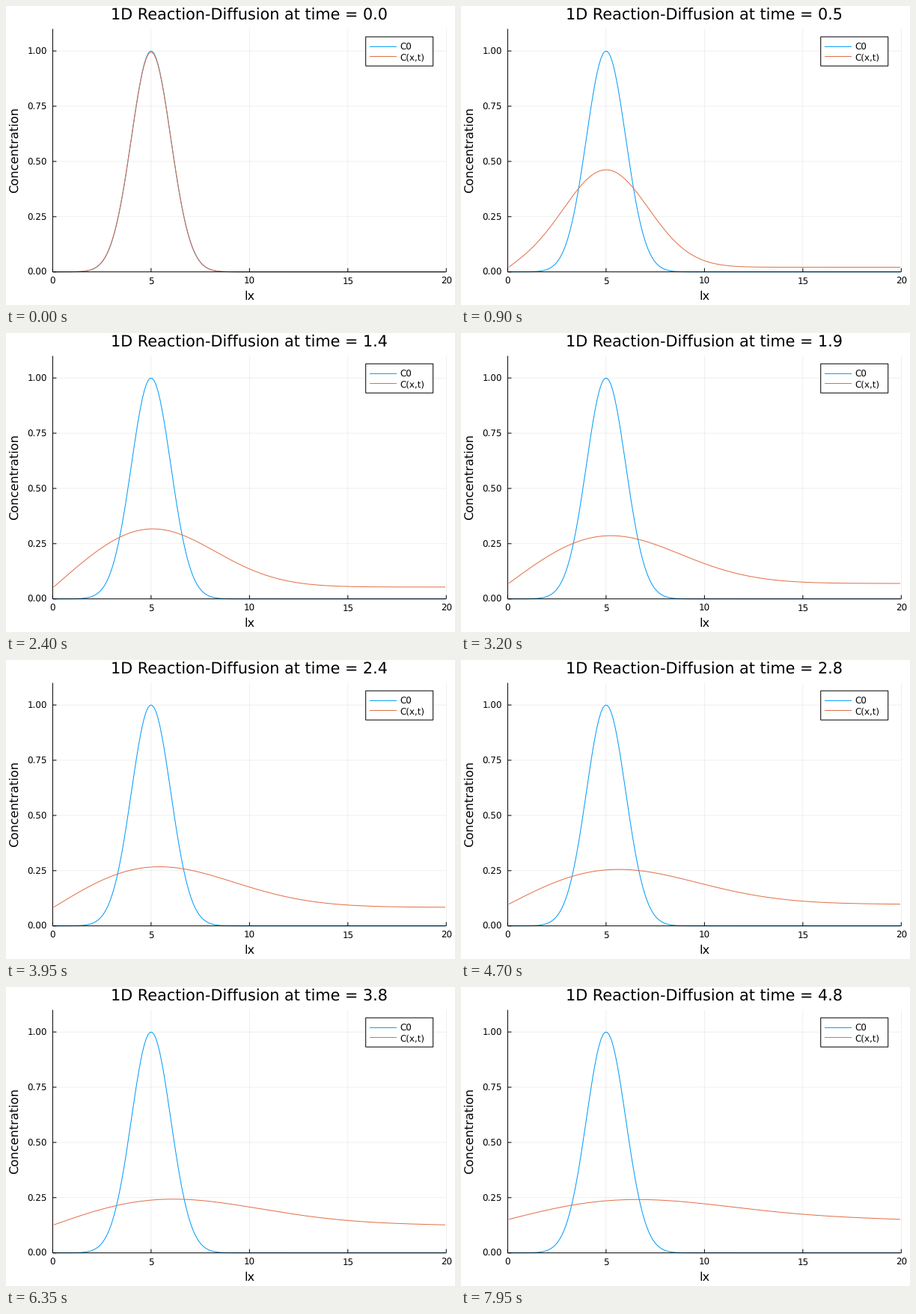
Animation, 600 px wide and 400 px high, one loop 8 s. Source, as a matplotlib script:

```python
import numpy as np
import matplotlib.pyplot as plt
from matplotlib.animation import FuncAnimation
from matplotlib.patches import Rectangle

W, H, DPI = 600, 400, 100
FRAMES, INTERVAL = 160, 50
LEFT, RIGHT, TOP, BOTTOM = 62.4, 588.3, 30.6, 355.7
BLUE, ORANGE = "#009AFA", "#E26F46"
TITLE, GUIDE, TICK = 20.75, 16.3, 11.86  # font sizes in pixels

# Physics: diffusion plus relaxation towards an equilibrium value
LX, NX = 20.0, 200
DX = LX / NX
DIFF, XI, C_EQ = 10 / 3, 10.0, 0.4
DT = DX**2 / DIFF / 2
STEPS = 20  # solver steps per frame

plt.rcParams.update({
    "font.family": "DejaVu Sans",
    "text.hinting": "none",
    "lines.solid_capstyle": "butt",
})


def px(n):
    """Pixels to points."""
    return n * 72 / DPI


def step(c):
    new = c - DT * (c - C_EQ) / XI
    new[1:-1] += DT * DIFF * np.diff(c, 2) / DX**2
    return new


def solve(c):
    profiles = []
    for _ in range(FRAMES):
        c = step(c)
        profiles.append(c)
        for _ in range(STEPS - 1):
            c = step(c)
    return profiles


x = np.linspace(DX / 2, LX - DX / 2, NX)
c0 = np.exp(-((x - LX / 4) ** 2) / 2)
profiles = solve(c0)

fig = plt.figure(figsize=(W / DPI, H / DPI), dpi=DPI, facecolor="white")
ax = fig.add_axes([LEFT / W, 1 - BOTTOM / H, (RIGHT - LEFT) / W, (BOTTOM - TOP) / H])
ax.set(xlim=(0, LX), ylim=(0, 1.1))
ax.axis("off")


def label(lx, ly, s, size, **kw):
    kw = {"ha": "center", "va": "baseline", **kw}
    return fig.text(lx / W, 1 - ly / H, s, fontsize=px(size), color="black", **kw)


def segment(xs, ys, color="black", width=1.0, z=6, **kw):
    line = plt.Line2D([v / W for v in xs], [1 - v / H for v in ys], color=color,
                      lw=px(width), zorder=z, snap=False, transform=fig.transFigure, **kw)
    fig.add_artist(line)


def grid(xs, ys):
    segment(xs, ys, width=0.6, z=-1, alpha=0.1)


segment([LEFT, LEFT], [TOP, BOTTOM])
segment([LEFT, RIGHT], [BOTTOM, BOTTOM])

for v in range(0, 21, 5):
    xp = LEFT + (RIGHT - LEFT) * v / LX
    if v > 0:
        grid([xp, xp], [TOP, BOTTOM])
    segment([xp, xp], [BOTTOM, BOTTOM - 5])
    label(xp, 372, str(v), TICK)

for v in np.arange(0, 1.01, 0.25):
    yp = BOTTOM - (BOTTOM - TOP) * v / 1.1
    if v > 0:
        grid([LEFT, RIGHT], [yp, yp])
    segment([LEFT, LEFT + 5], [yp, yp])
    label(54.8, yp + 4.6, f"{v:.2f}", TICK, ha="right")

label((LEFT + RIGHT) / 2, 392.6, "lx", GUIDE)
label(19.6, (TOP + BOTTOM) / 2 - 0.5, "Concentration", GUIDE,
      rotation=90, ha="right", va="center")
title = label((LEFT + RIGHT) / 2, 18.8, "", TITLE)

style = dict(lw=px(1), snap=False, clip_on=False)
ax.plot(x, c0, color=BLUE, zorder=3, **style)
curve, = ax.plot(x, profiles[0], color=ORANGE, zorder=4, **style)

# Legend
fig.add_artist(Rectangle((480.7 / W, 1 - 80.2 / H), 90 / W, 39 / H, fc="white", ec="black",
                         lw=px(1), snap=False, transform=fig.transFigure, zorder=7))
for yp, color, name in ((54.4, BLUE, "C0"), (67.5, ORANGE, "C(x,t)")):
    segment([486, 522], [yp, yp], color, z=8)
    label(526.5, yp + 4.5, name, TICK, ha="left", zorder=8)


def update(i):
    t = (1 + STEPS * i) * DT
    title.set_text(f"1D Reaction-Diffusion at time = {t:.1f}")
    curve.set_ydata(profiles[i])
    return curve, title


anim = FuncAnimation(fig, update, frames=FRAMES, interval=INTERVAL, repeat=True)
plt.show()
```
